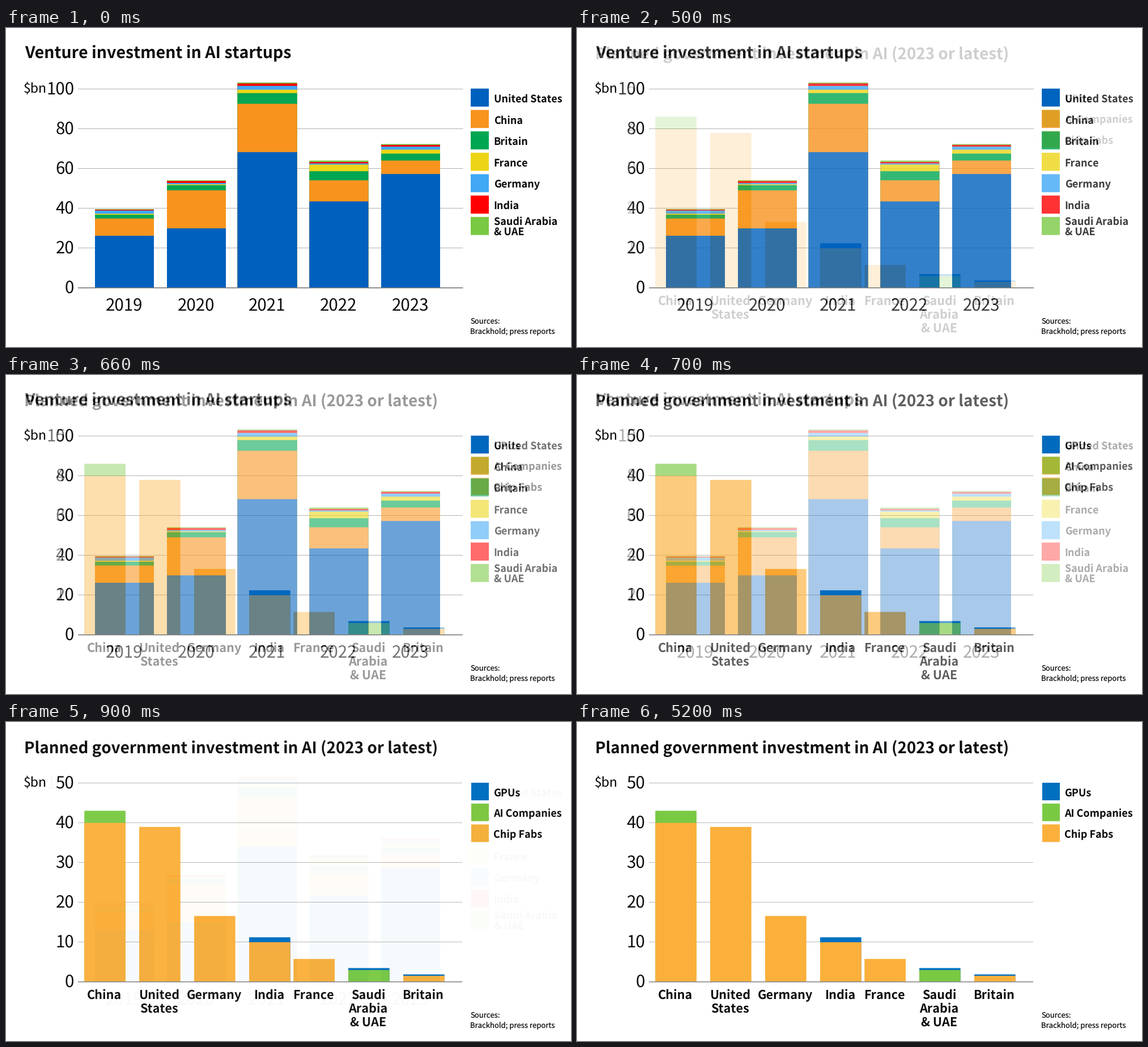
Write a matplotlib script that moves like this. It is 997 by 562 pixels and loops after 8000 ms.

```python
import matplotlib.pyplot as plt
import numpy as np
from matplotlib.animation import FuncAnimation
from matplotlib.patches import Rectangle

W, H, DPI = 997, 562, 64
BASE = 457.5
INK = "#0c0c0c"
FADE = (0.2, 0.42, 0.66, 0.86, 0.97)  # share of the second chart, one step per 100 ms
FADE_START = 5

BLUE, ORANGE, GREEN = "#0060bd", "#f8941e", "#00a651"
YELLOW, SKY, RED, LIME = "#ecd517", "#40a8f5", "#ff0000", "#7ac943"
GPU, FAB = "#0070bf", "#fbb03b"
DIGITS = 29.5

plt.rcParams["font.family"] = "Noto Sans CJK JP"
plt.rcParams["text.hinting"] = "none"

fig = plt.figure(figsize=(W / DPI, H / DPI), dpi=DPI, facecolor="white")


def new_axes():
    fig.clear()
    ax = fig.add_axes([0, 0, 1, 1])
    ax.set(xlim=(0, W), ylim=(H, 0))
    ax.axis("off")
    return ax


def rect(ax, x0, y0, x1, y1, color):
    ax.add_patch(Rectangle((x0, y0), x1 - x0, y1 - y0, fc=color, lw=0, snap=False))


def label(ax, x, y, text, px, weight="bold", ha="left"):
    ax.text(x, y, text, size=px * 72 / DPI, weight=weight, ha=ha,
            va="baseline", color=INK)


def frame(ax, title, x, y, px, right, step, grid, axis):
    """Title, grid, value labels and source note."""
    label(ax, x, y, title, px)
    label(ax, 31, 114.5, "$bn", 23, "normal")
    for i in range(6):
        gy = BASE - 70 * i
        label(ax, 120.3, gy + 9.3, str(step * i), DIGITS, "normal", "right")
        if i:
            rect(ax, 127, gy - 0.5, right, gy + 0.5, grid)
    rect(ax, 127, BASE - 0.5, right, BASE + 1, axis)
    label(ax, 819.3, 521, "Sources:", 13.1, "normal")
    label(ax, 819.3, 539, "Brackhold; press reports", 13.1, "normal")


def stack(ax, x0, x1, tops, colors):
    # Tallest first, so that each shorter piece covers the one behind it.
    for top, color in reversed(list(zip(tops, colors))):
        rect(ax, x0, top, x1, BASE - 0.5, color)


def venture(ax):
    frame(ax, "Venture investment in AI startups", 33, 53, 28.5, 806.5, 20,
          "#b0b0b0", "#6e6e6e")
    colors = (BLUE, ORANGE, GREEN, YELLOW, SKY, RED, LIME)
    bars = (
        (157, 261, (366, 335.7, 329, 327.3, 321.5, 320, 319)),
        (284, 388, (353, 286, 277, 275.5, 273, 269.7, 268.3)),
        (408.4, 513.7, (218.7, 133.5, 114.7, 108.7, 102, 97.7, 96)),
        (535.3, 639.4, (305.5, 268.3, 252.3, 240.7, 238.5, 236, 233.5)),
        (662, 766, (257.2, 233.5, 221.3, 214.3, 209, 206, 204.4)),
    )
    for i, (x0, x1, tops) in enumerate(bars):
        stack(ax, x0, x1, tops, colors)
        label(ax, (x0 + x1) / 2 - 0.7, 497.5, str(2019 + i), DIGITS, "normal", "center")

    names = ("United States", "China", "Britain", "France", "Germany", "India")
    for i, color in enumerate(colors):
        y = 106.7 + 37.7 * i
        rect(ax, 820, y, 852, y + 31.8, color)
    for i, name in enumerate(names):
        label(ax, 860.7, 130.7 + 37.6 * i, name, 18)
    label(ax, 860.7, 346.5, "Saudi Arabia", 18)
    label(ax, 860.7, 365.2, "& UAE", 18)


def planned(ax):
    frame(ax, "Planned government investment in AI (2023 or latest)", 32, 54, 27.8,
          805, 10, "#b8b8b8", "#828282")
    bars = (
        (138.2, "China", (177.7, 156.4), (FAB, LIME)),
        (235, "United\nStates", (184.8,), (FAB,)),
        (332, "Germany", (341.7,), (FAB,)),
        (429, "India", (388, 379.3), (FAB, GPU)),
        (507.3, "France", (417.4,), (FAB,)),
        (604, "Saudi\nArabia\n& UAE", (437, 433.5), (LIME, GPU)),
        (701, "Britain", (447.2, 444.7), (FAB, GPU)),
    )
    for x, name, tops, colors in bars:
        stack(ax, x, x + 72.7, tops, colors)
        for row, line in enumerate(name.split("\n")):
            label(ax, x + 35, 488 + 24 * row, line, 21.6, ha="center")

    keys = (("GPUs", GPU), ("AI Companies", LIME), ("Chip Fabs", FAB))
    for i, (name, color) in enumerate(keys):
        y = 107 + 36.7 * i
        rect(ax, 821, y, 852, y + 31, color)
        label(ax, 859.7, 130.7 + 36.5 * i, name, 18)


def render(chart):
    chart(new_axes())
    fig.canvas.draw()
    return np.asarray(fig.canvas.buffer_rgba())[..., :3].astype(float)


first, second = render(venture), render(planned)
fig.clear()
picture = fig.figimage(first.astype(np.uint8))


def update(i):
    step = i - FADE_START
    share = 0 if step < 0 else FADE[step] if step < len(FADE) else 1
    mix = first * (1 - share) + second * share
    picture.set_data(np.rint(mix).astype(np.uint8))
    return [picture]


anim = FuncAnimation(fig, update, frames=80, interval=100, repeat=True,
                     repeat_delay=0, blit=False)
plt.show()
```
